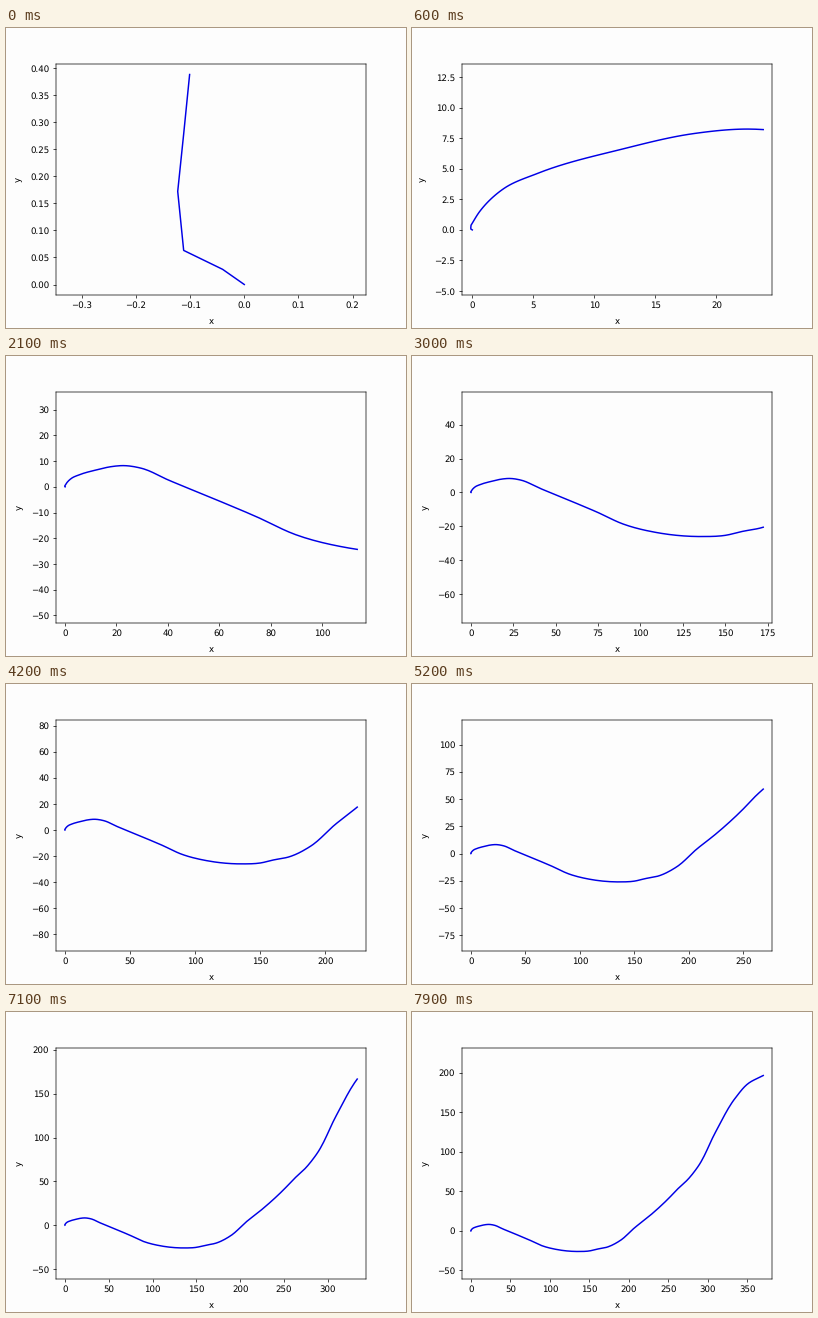
A matplotlib script for the animation above (8 s loop, 400x300 px).

```python
import numpy as np
import matplotlib.pyplot as plt
from matplotlib.animation import FuncAnimation

FRAMES, INTERVAL = 80, 100
AX_W, AX_H = 310, 231  # axes size in pixels
PAPER, INK = '#fdfdfd', '#0000e6'

plt.rcParams.update({
    'text.hinting': 'none', 'path.snap': False, 'axes.labelpad': 8.5,
    'ytick.major.pad': 4.2, 'figure.facecolor': PAPER,
    'axes.facecolor': PAPER})

# First slow steps, then the bends of the drive
START = np.array([(0, 0), (-.04, .028), (-.112, .063), (-.123, .172),
                  (-.112, .278), (-.101, .388)])
BENDS = np.array([
    (-.101, .388), (.6, 1.5), (2.6, 3.4), (5.4, 4.65), (12.2, 6.6),
    (18.2, 7.9), (22.6, 8.26), (29.8, 7.2), (40.2, 2.65), (58.3, -4.8),
    (74.4, -11.6), (89.7, -18.6), (110.4, -23.8), (136.4, -26),
    (150, -25.3), (160, -23), (172.4, -20.5), (188.9, -12.2),
    (207.3, 4.1), (224.4, 17.6), (250, 40.9), (261, 52.4), (275, 65.6),
    (287, 80.8), (309.6, 125), (335.4, 169.2), (350.6, 186.3),
    (370, 196.7)])

# x reached at a few moments; the pace between them follows cruise()
KEY_TIME = np.array([0, 12, 30, 42, 52, 63, 79])
KEY_X = [-.101, 58.3, 172.4, 224.4, 268.4, 309.6, 370]


def cruise(n, ramp=2.4):
    """Distance of a start from rest that settles to constant speed."""
    return np.hypot(n, ramp) - ramp


def arc_length(p):
    steps = np.hypot(*np.diff(p, axis=0).T)
    return np.concatenate([[0], np.cumsum(steps)])


def smooth(p, n=12):
    """Cubic Hermite curve through p, parametrised by chord length."""
    t = arc_length(p)
    slope = np.gradient(p, t, axis=0)
    u = np.linspace(0, 1, n, endpoint=False)[:, None]
    h00, h10 = (1 + 2 * u) * (1 - u) ** 2, u * (1 - u) ** 2
    h01, h11 = u * u * (3 - 2 * u), u * u * (u - 1)
    parts = [h00 * p[i] + h10 * dt * slope[i]
             + h01 * p[i + 1] + h11 * dt * slope[i + 1]
             for i, dt in enumerate(np.diff(t))]
    return np.vstack(parts + [p[-1:]])


path = np.vstack([START[:-1], smooth(BENDS)])
dist = arc_length(path)
first = len(START) - 1
key_dist = np.interp(KEY_X, path[first:, 0], dist[first:])
key_dist[0] = dist[first]
reach = np.interp(cruise(np.arange(FRAMES)), cruise(KEY_TIME), key_dist)

fig, ax = plt.subplots(figsize=(6.4, 4.8), dpi=62.5)
ax.set_xlabel('x')
ax.set_ylabel('y')
line, = ax.plot([], [], color=INK, lw=1.7)


def update(i):
    s = reach[i]
    tip = [np.interp(s, dist, path[:, k]) for k in (0, 1)]
    done = np.vstack([path[dist < s], tip])
    line.set_data(*done.T)

    # Equal units on both axes, centred on the data
    lo, hi = done.min(axis=0), done.max(axis=0)
    mid, span = (lo + hi) / 2, hi - lo
    unit = max(1.06 * span[0] / AX_W, 1.1 * span[1] / AX_H)
    half_w, half_h = unit * AX_W / 2, unit * AX_H / 2
    ax.set_xlim(mid[0] - half_w, mid[0] + half_w)
    ax.set_ylim(mid[1] - half_h, mid[1] + half_h)
    return line,


anim = FuncAnimation(fig, update, frames=FRAMES, interval=INTERVAL,
                     repeat=True, repeat_delay=0, blit=False)
plt.show()
```
